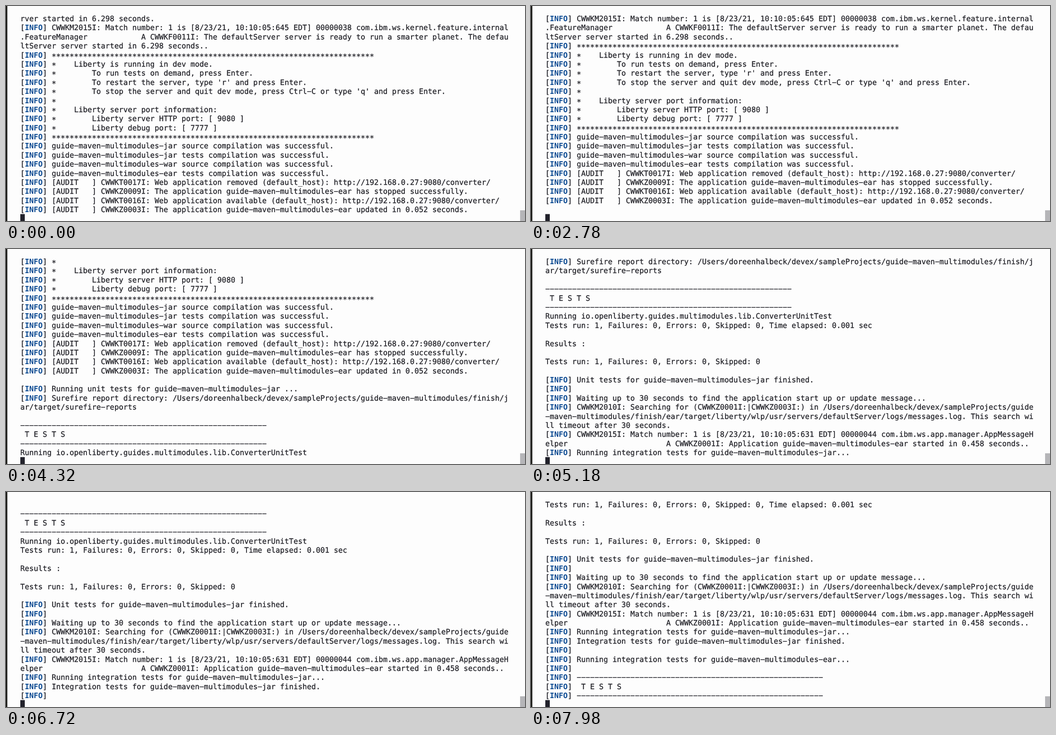
Recreate the animation shown at these times as an HTML page. Size 1161 by 482 pixels, loop 8000 ms.

```html
<!DOCTYPE html>
<html lang="en">
<head>
<meta charset="utf-8">
<title>Dev mode console</title>
<style>
  html, body { margin: 0; width: 100%; height: 100%; overflow: hidden; background: #fdfdfd; }
  svg { display: block; width: 1161px; height: 482px; }
  text {
    font: 16.65px "DejaVu Sans Mono", monospace;
    fill: #222228;
    stroke: #222228;
    stroke-width: 0.3px;
    white-space: pre;
    text-rendering: geometricPrecision;
  }
  .level { font-weight: bold; fill: #0b4a92; stroke: none; }
  .star { baseline-shift: -3.3px; }
</style>
</head>
<body>
<svg id="stage" viewBox="0 0 1161 482" xmlns="http://www.w3.org/2000/svg">
  <rect width="1161" height="482" fill="#fdfdfd"/>
  <rect width="3" height="482" fill="#20201c"/>
  <g id="screen"></g>
  <rect x="32" y="466.5" width="10" height="15.5" fill="#22222b"/>
  <rect x="1150" y="458" width="11" height="24" fill="#b5b5b8"/>
</svg>
<script>
const LOOP = 8000;
const COLUMNS = 109;
const ROWS = 22;
const LEFT = 32;
const BASELINE = 34.1;
const LINE_HEIGHT = 20.38;

const info = (message = '') => '[INFO] ' + message;
const audit = message => info('[AUDIT   ] ' + message);
const stars = info('*'.repeat(72));
const rule = '-'.repeat(55);
const app = 'guide-maven-multimodules';
const home = '/Users/doreenhalbeck/devex/sampleProjects/' + app;
const url = 'http://192.168.0.27:9080/converter/';
const counts = 'Tests run: 1, Failures: 0, Errors: 0, Skipped: 0';

// Console output, grouped by the moment it is printed
const output = [
  [0, [
    'rver started in 6.298 seconds.',
    info('CWWKM2015I: Match number: 1 is [8/23/21, 10:10:05:645 EDT] 00000038 com.ibm.ws.kernel.feature.internal.FeatureManager'
      + ' '.repeat(12) + 'A CWWKF0011I: The defaultServer server is ready to run a smarter planet. The defaultServer server started in 6.298 seconds..'),
    stars,
    info('*    Liberty is running in dev mode.'),
    info('*        To run tests on demand, press Enter.'),
    info("*        To restart the server, type 'r' and press Enter."),
    info("*        To stop the server and quit dev mode, press Ctrl-C or type 'q' and press Enter."),
    info('*'),
    info('*    Liberty server port information:'),
    info('*        Liberty server HTTP port: [ 9080 ]'),
    info('*        Liberty debug port: [ 7777 ]'),
    stars,
    ...['jar source', 'jar tests', 'war source', 'ear tests']
      .map(part => info(`${app}-${part} compilation was successful.`)),
    audit(`CWWKT0017I: Web application removed (default_host): ${url}`),
    audit(`CWWKZ0009I: The application ${app}-ear has stopped successfully.`),
    audit(`CWWKT0016I: Web application available (default_host): ${url}`),
    audit(`CWWKZ0003I: The application ${app}-ear updated in 0.052 seconds.`),
  ]],
  [2080, ['']],
  [3720, [
    info(`Running unit tests for ${app}-jar ...`),
    info(`Surefire report directory: ${home}/finish/jar/target/surefire-reports`),
    '',
    rule,
    ' T E S T S',
    rule,
    'Running io.openliberty.guides.multimodules.lib.ConverterUnitTest',
  ]],
  [4620, [
    counts + ', Time elapsed: 0.001 sec',
    '',
    'Results :',
    '',
    counts,
    '',
    info(`Unit tests for ${app}-jar finished.`),
    info(),
    info('Waiting up to 30 seconds to find the application start up or update message...'),
    info(`CWWKM2010I: Searching for (CWWKZ0001I:|CWWKZ0003I:) in ${home}/finish/ear/target/liberty/wlp/usr/servers/defaultServer/logs/messages.log. This search will timeout after 30 seconds.`),
    info('CWWKM2015I: Match number: 1 is [8/23/21, 10:10:05:631 EDT] 00000044 com.ibm.ws.app.manager.AppMessageHelper'
      + ' '.repeat(22) + `A CWWKZ0001I: Application ${app}-ear started in 0.458 seconds..`),
    info(`Running integration tests for ${app}-jar...`),
  ]],
  [5400, [
    info(`Integration tests for ${app}-jar finished.`),
    info(),
  ]],
  [7060, [info(`Running integration tests for ${app}-ear...`)]],
  [7740, [info(), info(rule), info(' T E S T S'), info(rule)]],
];

const wrap = line => line.match(new RegExp(`.{1,${COLUMNS}}`, 'g')) || [''];

const log = output.flatMap(([time, lines]) =>
  lines.flatMap(wrap).map(text => ({ time, text })));

function svg(tag, attributes, parent) {
  const node = document.createElementNS('http://www.w3.org/2000/svg', tag);
  for (const name in attributes) node.setAttribute(name, attributes[name]);
  return parent.appendChild(node);
}

const screen = document.getElementById('screen');
const rows = Array.from({ length: ROWS }, (_, i) =>
  svg('text', { x: LEFT, y: BASELINE + i * LINE_HEIGHT }, screen));

function styleOf(run) {
  if (run === 'INFO') return 'level';
  return run[0] === '*' ? 'star' : 'plain';
}

// Hyphens are drawn wide, as in the terminal's typeface
function fillRow(row, text) {
  row.replaceChildren();
  for (const run of text.split(/(INFO|\*+)/).filter(Boolean)) {
    svg('tspan', { class: styleOf(run) }, row).textContent = run.replace(/-/g, '\u2212');
  }
}

let shown = -1;

function render(time) {
  const printed = log.filter(line => line.time <= time);
  if (printed.length === shown) return;
  shown = printed.length;
  printed.slice(-ROWS).forEach((line, i) => fillRow(rows[i], line.text));
}

const start = performance.now();

function tick() {
  render((performance.now() - start) % LOOP);
  requestAnimationFrame(tick);
}

tick();
</script>
</body>
</html>
```
